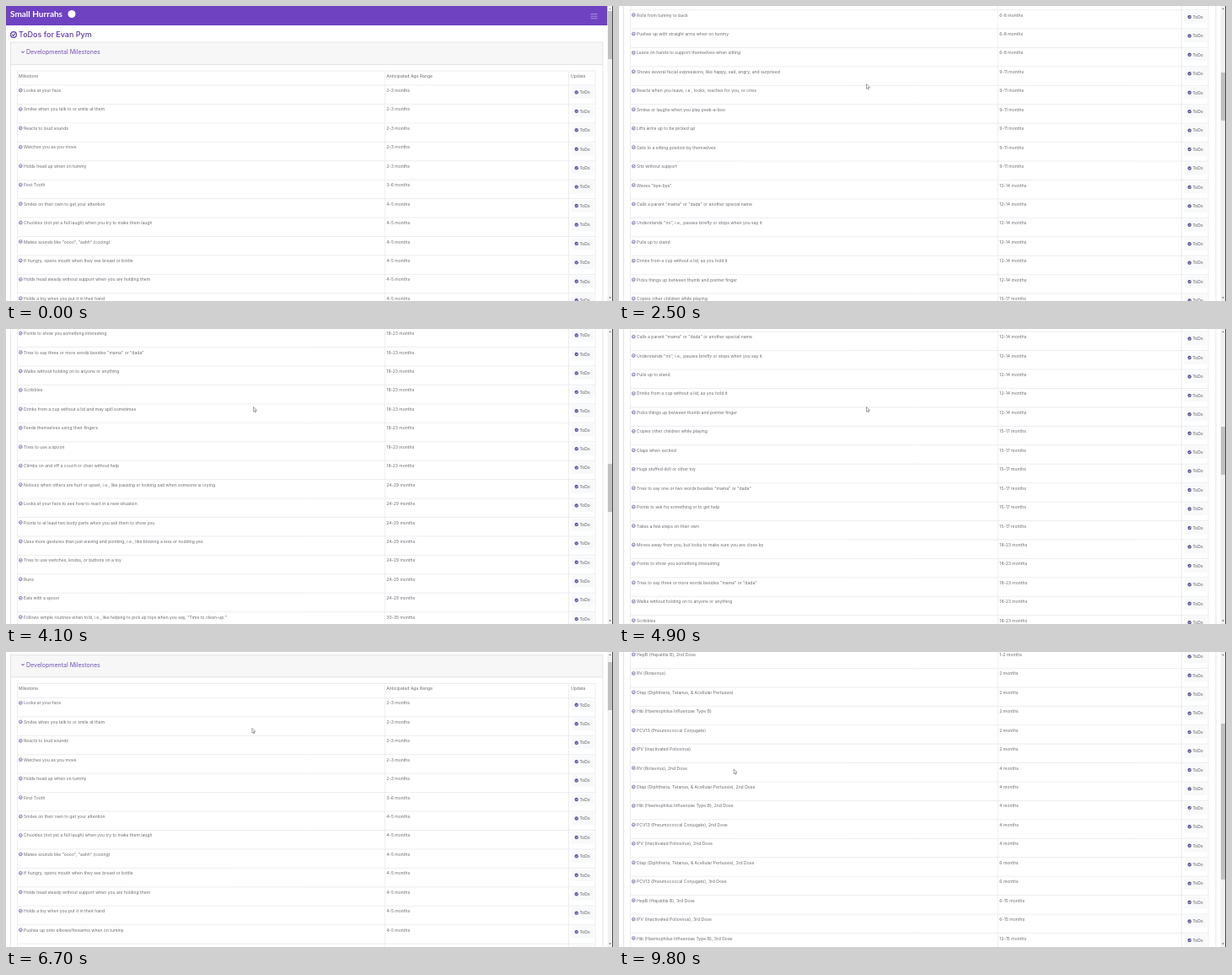
These frames come from a looping animation (720 px wide and 350 px high, 9900 ms). An HTML page with a canvas:

```html
<!DOCTYPE html>
<html lang="en">
<head>
<meta charset="utf-8">
<title>ToDos</title>
<style>
html, body { margin: 0; width: 100%; height: 100%; overflow: hidden; background: #fff; }
canvas { display: block; width: 720px; height: 350px; }
</style>
</head>
<body>
<canvas id="stage" width="720" height="350"></canvas>
<script>
const canvas = document.getElementById('stage');
const ctx = canvas.getContext('2d');
const LOOP = 9900, STAGE_W = 720, STAGE_H = 350, PITCH = 22.44, SMALL = 5.07;
const PURPLE = '#6f42c1', DEEP = '#5d3aa8', ICON = '#5c4a98', INK = '#6c6c74', LINE = '#e8e9ed';

// Each group: age range, then its entries
const expand = groups => groups.flatMap(([age, list]) =>
  list.split('|').map(name => ({ name, age })));

const milestones = expand([
  ['2-3 months', 'Looks at your face|Smiles when you talk to or smile at them|Reacts to loud sounds|Watches you as you move|Holds head up when on tummy'],
  ['3-6 months', 'First Tooth'],
  ['4-5 months', 'Smiles on their own to get your attention|Chuckles (not yet a full laugh) when you try to make them laugh|Makes sounds like "oooo", "aahh" (cooing)|If hungry, opens mouth when they see breast or bottle|Holds head steady without support when you are holding them|Holds a toy when you put it in their hand|Pushes up onto elbows/forearms when on tummy'],
  ['6-8 months', 'Knows familiar people|Laughs|Blows "raspberries" (sticks tongue out and blows)|Rolls from tummy to back|Pushes up with straight arms when on tummy|Leans on hands to support themselves when sitting'],
  ['9-11 months', 'Shows several facial expressions, like happy, sad, angry, and surprised|Reacts when you leave, i.e., looks, reaches for you, or cries|Smiles or laughs when you play peek-a-boo|Lifts arms up to be picked up|Gets to a sitting position by themselves|Sits without support'],
  ['12-14 months', 'Waves "bye-bye"|Calls a parent "mama" or "dada" or another special name|Understands "no", i.e., pauses briefly or stops when you say it|Pulls up to stand|Drinks from a cup without a lid, as you hold it|Picks things up between thumb and pointer finger'],
  ['15-17 months', 'Copies other children while playing|Claps when excited|Hugs stuffed doll or other toy|Tries to say one or two words besides "mama" or "dada"|Points to ask for something or to get help|Takes a few steps on their own'],
  ['18-23 months', 'Moves away from you, but looks to make sure you are close by|Points to show you something interesting|Tries to say three or more words besides "mama" or "dada"|Walks without holding on to anyone or anything|Scribbles|Drinks from a cup without a lid and may spill sometimes|Feeds themselves using their fingers|Tries to use a spoon|Climbs on and off a couch or chair without help'],
  ['24-29 months', 'Notices when others are hurt or upset, i.e., like pausing or looking sad when someone is crying|Looks at your face to see how to react in a new situation|Points to at least two body parts when you ask them to show you|Uses more gestures than just waving and pointing, i.e., like blowing a kiss or nodding yes|Tries to use switches, knobs, or buttons on a toy|Runs|Eats with a spoon'],
  ['30-35 months', 'Follows simple routines when told, i.e., like helping to pick up toys when you say, "Time to clean-up."|Says about 50 words|Names things in a book when you point']
]);

const DTAP = 'Dtap (Diphtheria, Tetanus, & Acellular Pertussis)';
const HIB = 'Hib (Haemophilus Influenzae Type B)';
const PCV = 'PCV13 (Pneumococcal Conjugate)';
const IPV = 'IPV (Inactivated Poliovirus)';
const HEPB = 'HepB (Hepatitis B)', RV = 'RV (Rotavirus)';
const dose = (n, ...names) => names.map(name => `${name}, ${n} Dose`).join('|');
const vaccines = expand([
  ['Birth', HEPB],
  ['1-2 months', dose('2nd', HEPB)],
  ['2 months', [RV, DTAP, HIB, PCV, IPV].join('|')],
  ['4 months', dose('2nd', RV, DTAP, HIB, PCV, IPV)],
  ['6 months', dose('3rd', DTAP, PCV)],
  ['6-15 months', dose('3rd', HEPB, IPV)],
  ['12-15 months', dose('3rd', HIB) + '|' + dose('4th', PCV) + '|MMR (Measles, Mumps, & Rubella)|Varicella (Chickenpox)'],
  ['12-23 months', 'HepA (Hepatitis A)'],
  ['15-18 months', dose('4th', DTAP)]
]);

const cards = [
  { title: 'Developmental Milestones', column: 'Milestone', rows: milestones, count: 86 },
  { title: 'Immunizations', column: 'Vaccine', rows: vaccines, count: 22 }
];
const bodyHeight = card => 32.5 + card.count * PITCH;

// Keys: [time, value, ...]
const scrollKeys = [[1000, 0], [1300, 73], [1600, 150], [1700, 150], [2500, 448.5],
  [2600, 448.5], [3800, 975], [3900, 975], [4100, 948], [4600, 750], [4700, 750],
  [5000, 637], [5100, 637], [5700, 411], [5800, 411], [6700, 40], [6800, 0],
  [9400, 0], [9800, 150]];
const cursorKeys = [[300, 330, 150], [500, 293.5, 92.5], [6600, 293.5, 92.5],
  [6700, 292, 90.5], [6800, 285, 86], [7000, 285, 86], [7200, 137, 54],
  [7700, 137, 54], [8200, 137, 84], [8450, 137, 84], [8900, 136.2, 139]];

function at(keys, t) {
  const next = keys.findIndex(k => k[0] > t);
  if (next === 0) return keys[0].slice(1);
  if (next < 0) return keys[keys.length - 1].slice(1);
  const a = keys[next - 1], b = keys[next], p = (t - a[0]) / (b[0] - a[0]);
  return a.slice(1).map((v, i) => v + (b[i + 1] - v) * p);
}

function progress(t, start, length) {
  const p = Math.min(1, Math.max(0, (t - start) / length));
  return p * p * (3 - 2 * p);
}

function box(x, y, w, h, color) {
  ctx.fillStyle = color;
  ctx.fillRect(x, y, w, h);
}

function frame(x, y, w, h, color) {
  ctx.strokeStyle = color;
  ctx.lineWidth = 0.8;
  ctx.strokeRect(x, y, w, h);
}

function text(str, x, y, size, color, weight = 400, family = 'Inter') {
  ctx.font = `${weight} ${size}px ${family}, sans-serif`;
  ctx.fillStyle = color;
  ctx.fillText(str, x, y);
}

function path(points, color, width) {
  ctx.beginPath();
  points.forEach(([x, y]) => ctx.lineTo(x, y));
  ctx.strokeStyle = color;
  ctx.lineWidth = width;
  ctx.stroke();
}

function check(x, y, r, filled, color = ICON, width = 0.7) {
  ctx.beginPath();
  ctx.arc(x, y, r, 0, Math.PI * 2);
  ctx.fillStyle = ctx.strokeStyle = color;
  ctx.lineWidth = width;
  filled ? ctx.fill() : ctx.stroke();
  path([[x - r * 0.5, y], [x - r * 0.1, y + r * 0.4], [x + r * 0.55, y - r * 0.4]],
    filled ? '#fff' : color, width);
}

function drawNav(width) {
  box(0, 0, width, 23, PURPLE);
  text('Small Hurrahs', 5, 13, 10, '#fff', 700, 'Lato');
  ctx.beginPath();
  ctx.arc(78, 9.5, 4.5, 0, Math.PI * 2);
  ctx.fill();
  for (const y of [9, 11.7, 14.4]) box(width - 20, y, 8, 0.8, 'rgba(255,255,255,.5)');
  check(9, 34, 3.4, false, DEEP, 1.2);
  text('ToDos for Evan Pym', 15, 37.3, 9, DEEP, 500);
}

function drawTable(card, top, width, scroll) {
  const left = 13.5, right = width - 14.5, ageX = 13 + (width - 28) * 0.6365, editX = width - 46;
  const first = top + 51, bottom = first + card.count * PITCH;
  frame(left, top + 34, right - left, bottom - top - 34, LINE);
  for (const x of [ageX, editX]) path([[x, top + 34], [x, bottom]], LINE, 0.8);
  text(card.column, 15, top + 41.5, SMALL, INK);
  text('Anticipated Age Range', ageX + 2, top + 41.5, SMALL, INK);
  text('Update', editX + 2.5, top + 41.5, SMALL, INK);

  const from = Math.max(0, Math.floor((scroll - first) / PITCH));
  const to = Math.min(card.rows.length, from + 18);
  for (let i = from; i < to; i++) {
    const y = first + i * PITCH, row = card.rows[i];
    path([[left, y], [right, y]], LINE, 0.8);
    check(17.3, y + 6, 1.9, false);
    text(row.name, 21, y + 8, SMALL, INK);
    text(row.age, ageX + 2, y + 8, SMALL, INK);
    box(editX + 3, y + 1.5, 27, 14.5, '#f8f9fa');
    check(editX + 9.2, y + 8.4, 2.2, true);
    text('ToDo', editX + 13, y + 10.2, 4.9, '#55555d');
  }
}

function drawCard(card, top, open, width, scroll) {
  const body = bodyHeight(card) * open, right = width - 5.5;
  box(5.5, top, right - 5.5, 26.5, '#f7f7f7');
  path([[5.5, top + 26.5], [right, top + 26.5]], '#dfdfdf', 0.8);
  ctx.save();
  ctx.translate(20, top + 11.6);
  ctx.rotate((open > 0.5 ? 0 : -1) * Math.PI / 2);
  path([[-1.6, -0.9], [0, 0.9], [1.6, -0.9]], DEEP, 1);
  ctx.restore();
  text(card.title, 24, top + 14.2, 7.05, '#7350b8');
  if (body > 0) {
    ctx.save();
    ctx.beginPath();
    ctx.rect(0, top + 26.5, width, body);
    ctx.clip();
    drawTable(card, top, width, scroll);
    ctx.restore();
  }
  frame(5.5, top, right - 5.5, 26.5 + body, '#dfdfdf');
  return top + 30.5 + body;
}

function drawScrollbar(scroll, height) {
  box(713.5, 0, 5.5, STAGE_H, '#f1f1f1');
  const scale = 338 / height;
  box(714, Math.round(6 + scroll * scale), 5, Math.round(STAGE_H * scale), '#c1c1c1');
  const arrow = (y, d, color) => {
    ctx.beginPath();
    ctx.moveTo(715.1, y);
    ctx.lineTo(717.9, y);
    ctx.lineTo(716.5, y + d);
    ctx.fillStyle = color;
    ctx.fill();
  };
  arrow(4, -1.6, scroll > 0 ? '#707070' : '#a3a3a3');
  arrow(345.5, 1.6, '#505050');
}

function drawCursor(x, y) {
  ctx.beginPath();
  for (const [dx, dy] of [[0, 0], [0, 5.6], [1.3, 4.5], [2.1, 6.4], [3, 6], [2.1, 4.1], [3.9, 4]])
    ctx.lineTo(x + dx, y + dy);
  ctx.closePath();
  ctx.fillStyle = '#fff';
  ctx.fill();
  ctx.strokeStyle = '#66666c';
  ctx.lineWidth = 0.6;
  ctx.stroke();
}

function draw(t) {
  const [scroll] = at(scrollKeys, t);
  const open = [1 - progress(t, 7320, 350), progress(t, 8350, 350)];
  const height = 43 + 2 * 30.5 + 10 + cards.reduce((sum, c, i) => sum + bodyHeight(c) * open[i], 0);
  const scrolls = height > STAGE_H, width = scrolls ? 713.5 : STAGE_W;

  box(0, 0, STAGE_W, STAGE_H, '#fff');
  ctx.save();
  ctx.translate(0, -scroll);
  drawNav(width);
  cards.reduce((y, card, i) => drawCard(card, y, open[i], width, scroll), 43);
  ctx.restore();
  if (scrolls) drawScrollbar(scroll, height);
  box(STAGE_W - 1, 0, 1, STAGE_H, '#4a4a4a');
  if (t >= 300) drawCursor(...at(cursorKeys, t));
}

const start = performance.now();
function tick() {
  draw((performance.now() - start) % LOOP);
  requestAnimationFrame(tick);
}
tick();
</script>
</body>
</html>
```
